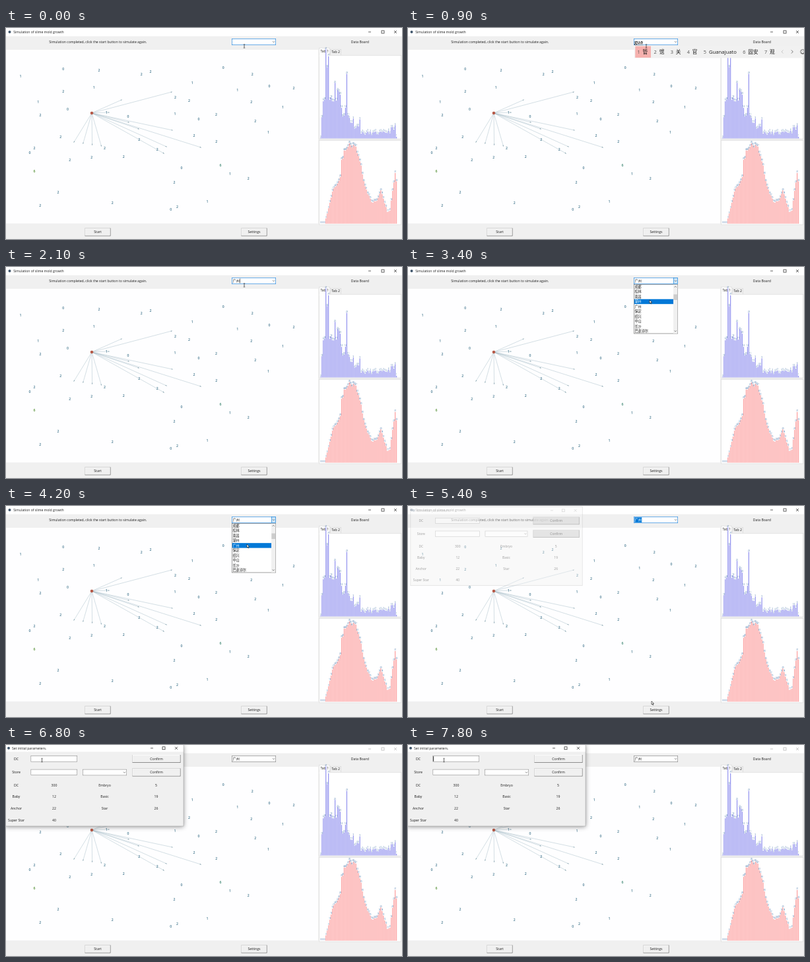
Animation, 600 px wide and 320 px high, one loop 8 s. Source, as an HTML page with a canvas:

```html
<!DOCTYPE html>
<html lang="en">
<head>
<meta charset="utf-8">
<title>Slime mold growth</title>
<style>
html, body { margin: 0; width: 100%; height: 100%; overflow: hidden; background: #f0f0f0; }
canvas { display: block; }
</style>
</head>
<body>
<canvas id="stage" width="600" height="320"></canvas>
<script>
const LOOP = 8000, STEP = 100;
const BLUE = '#0078d7', GREY = '#f0f0f0', INK = '#1c1c1c';
const FONT = '"Open Sans", "Noto Sans CJK SC", "Noto Sans CJK", sans-serif';
const ctx = document.getElementById('stage').getContext('2d');

const clamp = v => Math.max(0, Math.min(1, v));
const lerp = (a, b, k) => a + (b - a) * k;

function seeded(seed) {
  return () => (seed = seed * 16807 % 2147483647) / 2147483647;
}

// Value (or values) at t on a line through [t, ...values] key points
function along(points, t) {
  const next = points.findIndex(p => p[0] >= t);
  if (next < 1) return points.at(next).slice(1);
  const [a, b] = [points[next - 1], points[next]], k = (t - a[0]) / (b[0] - a[0]);
  return a.slice(1).map((v, i) => lerp(v, b[i + 1], k));
}

function fill(x, y, w, h, color) {
  ctx.fillStyle = color;
  ctx.fillRect(x, y, w, h);
}

function box(x, y, w, h, color, border, weight = 0.7) {
  fill(x, y, w, h, color);
  ctx.strokeStyle = border;
  ctx.lineWidth = weight;
  ctx.strokeRect(x + weight / 2, y + weight / 2, w - weight, h - weight);
}

function line(points, color, weight = 0.7) {
  ctx.strokeStyle = color;
  ctx.lineWidth = weight;
  ctx.beginPath();
  points.forEach(([x, y]) => ctx.lineTo(x, y));
  ctx.stroke();
}

function disc(x, y, r, color) {
  ctx.fillStyle = color;
  ctx.beginPath();
  ctx.arc(x, y, r, 0, 7);
  ctx.fill();
}

function text(str, x, y, { color = INK, size = 5.15, align = 'left', weight = 400 } = {}) {
  ctx.font = `${weight} ${size}px ${FONT}`;
  ctx.fillStyle = color;
  ctx.textAlign = align;
  ctx.fillText(str, x, y + size * 0.36);
  return ctx.measureText(str).width;
}

const centred = (str, x, y, options) => text(str, x, y, { align: 'center', ...options });

function chevron(x, y, dy) {
  line([[x - 1.6, y - dy], [x, y + dy], [x + 1.6, y - dy]], '#555');
}

function button(label, x, y, w, h) {
  fill(x, y, w, h, '#707070');
  fill(x, y, w - 0.8, h - 0.8, '#fff');
  fill(x + 0.7, y + 0.7, w - 1.8, h - 1.8, GREY);
  centred(label, x + w / 2, y + h / 2);
}

function windowButtons([min, max, close], y, color) {
  line([[min - 2, y], [min + 2, y]], color);
  ctx.strokeRect(max - 2, y - 2, 4, 4);
  line([[close - 2, y - 2], [close + 2, y + 2]], color);
  line([[close - 2, y + 2], [close + 2, y - 2]], color);
}

// Colony: food values scattered over a jittered grid, thinner towards the bottom
const random = seeded(42);
const food = [];
for (let row = 0; row < 7; row++)
  for (let col = 0; col < 9; col++) {
    const x = 22 + (col + random()) * 47, y = 56 + (row + random()) * 32;
    const label = '2222211100'[Math.floor(random() * 10)];
    if (random() > row * 0.09) food.push({ label, x, y });
  }

const NODE = [130, 129];
const trails = [[175, 109], [251, 97], [156, 128], [186, 143], [201, 153], [252, 155], [243, 180], [239, 190], [295, 181]];
for (let i = 0; i < 4; i++) trails.push([103 + i * 13.8, 173 + i * 2]);

function trail(x, y) {
  line([NODE, [x, y]], '#a9bfc8', 0.5);
  const a = Math.atan2(y - NODE[1], x - NODE[0]);
  ctx.fillStyle = '#6f919e';
  ctx.beginPath();
  for (const turn of [0, 2.7, -2.7]) ctx.lineTo(x + 1.4 * Math.cos(a + turn), y + 1.4 * Math.sin(a + turn));
  ctx.fill();
}

function colony() {
  fill(0, 33, 473, 263.5, '#fefeff');
  trails.forEach(end => trail(...end));
  for (const { label, x, y } of food) centred(label, x, y, { color: '#3f748c', weight: 600 });
  centred('6', 43, 217, { color: '#4c8a2c', weight: 600 });
  centred('6', 325, 208, { color: '#35806c', weight: 600 });
  disc(...NODE, 2.3, '#b65a48');
}

// Charts: a few key points plus noise
function bars(points, noise, seed) {
  const next = seeded(seed);
  return Array.from({ length: 59 }, (_, i) => {
    const [h] = along(points, i);
    return h * (1 + noise * (next() - 0.5));
  });
}

const blueBars = bars([[0, 2], [2, 65], [4, 108], [6, 123], [7, 60], [13, 80], [15, 54], [19, 40], [20, 92], [21, 34],
  [29, 16], [30, 44], [31, 8], [49, 8], [57, 16], [58, 4]], 0.7, 11);
const redBars = bars([[3, 0], [9, 48], [15, 70], [16, 98], [20, 117], [27, 119], [31, 86], [34, 56], [39, 32], [43, 34],
  [46, 52], [51, 18], [53, 20], [57, 77], [58, 64]], 0.08, 5);

function chart(heights, base, scale, color) {
  heights.forEach((h, i) => {
    const x = 476.2 + i * 1.98;
    fill(x, base - h, 1.15, h, color);
    centred(Math.round(h * scale), x + 0.6, base - h - 1.6, { size: 2.6, color: '#3d6fa5' });
  });
}

function board() {
  centred('Data Board', 536.3, 21);
  box(491, 32, 17, 10, GREY, '#d9d9d9');
  box(474, 41, 125, 127.5, '#fff', '#d9d9d9');
  box(474, 30, 17, 12, '#fff', '#d9d9d9');
  fill(474.7, 41, 15.6, 2, '#fff');
  box(474, 170, 125, 128.5, '#fff', '#d9d9d9');
  centred('Tab 1', 482.8, 35.5);
  centred('Tab 2', 499.5, 36.2);
  chart(blueBars, 167.5, 0.3, '#8e8eee');
  chart(redBars, 296.8, 0.4, '#fc9a9a');
}

// City box
const cities = ['成都', '桂林', '南昌', '湖州', '广州', '保定', '绍兴', '中山', '长沙', '巴彦淖尔'];
const typed = ['g', 'gu', 'gua', 'guan', 'guang', "guang'zh", "guang'zho", "guang'zhou"];
const typedAt = t => typed[Math.min(typed.length - 1, (t - 700) / STEP)];

function cityBox(t) {
  const open = t >= 3000 && t < 4500, focused = t < 6800;
  box(342, 16, 67, 10, '#fff', focused ? '#2b8ade' : '#8a8a8a');
  if (open) box(402, 16.3, 7, 9.5, '#cce4f7', BLUE, 0.6);
  chevron(405.5, 21, 0.8);
  if (t >= 700 && t < 1700) {
    const w = text(typedAt(t), 343, 21.8, { size: 7.4, weight: 600 });
    fill(343, 25, w, 0.5, '#444');
  } else if (t >= 1700) {
    const selected = t >= 4500 && focused;
    if (selected) fill(343.3, 17.3, 11, 7.6, BLUE);
    text('广州', 343.6, 21, { color: selected ? '#fff' : INK });
    if (t < 3000) fill(354.2, 17.5, 0.6, 7, INK);
  }
  if (open) cityList(t);
}

function cityList(t) {
  const active = t >= 3400 && t < 4200 ? 3 : 4, pitch = 7.45;
  box(342, 26, 67, 75.3, '#fff', '#777');
  cities.forEach((city, i) => {
    const y = 30.1 + i * pitch;
    if (i === active) fill(342.7, y - pitch / 2, 59.3, pitch, BLUE);
    text(city, 343.4, y, { color: i === active ? '#fff' : INK });
  });
  fill(402, 26.7, 6.3, 74, GREY);
  fill(402.3, 41.5, 5.8, 8.5, '#cdcdcd');
  chevron(405.2, 30, -0.8);
  chevron(405.2, 97.2, 0.8);
}

// Input method bar
const candidates = {
  g: ['个', '高', '给', '过', '跟', '更', '该'],
  gu: ['古', '故', '股', '顾', '固', '骨', '鼓'],
  gua: ['管', '馆', '关', '官', 'Guanajuato', '固安', '观'],
  guan: ['管', '馆', '关', '官', '观', '罐', '冠'],
  guang: ['光', '广', '逛', '广州', '广东', '广告', '光明'],
  "guang'zh": ['广州', '光照', '广州市', '光泽', '广', '光'],
};

function inputBar(t) {
  if (t < 700 || t >= 1800) return;
  ctx.save();
  ctx.globalAlpha = t === 700 || t === 1700 ? 0.5 : 1;
  ctx.translate(0, t === 700 ? 7 : 0);
  fill(343, 26.5, 257, 19, '#f1f1f1');
  fill(344.3, 27.5, 23.7, 17.5, '#f6b1ae');
  let x = 347.5;
  (candidates[typedAt(t)] || candidates["guang'zh"]).forEach((word, i) => {
    text(i + 1, x, 36.2, { size: 7.4, color: '#555' });
    x += 8.1 + text(word, x + 8.1, 36.2, { size: 7.7, weight: 500 }) + 9.3;
  });
  fill(560, 27, 40, 18, '#f1f1f1');
  line([[568.5, 33.5], [566, 36], [568.5, 38.5]], '#b5b5b5');
  line([[580.8, 33.5], [583.3, 36], [580.8, 38.5]], '#444');
  ctx.beginPath();
  ctx.arc(598, 36, 3.4, 0, 7);
  ctx.moveTo(599.7, 37);
  ctx.arc(598, 37, 1.7, 0, Math.PI);
  ctx.stroke();
  disc(596.8, 35, 0.5, '#444');
  disc(599.2, 35, 0.5, '#444');
  ctx.restore();
}

// Settings dialog
const settings = [['DC', 300, 'Embryo', 5], ['Baby', 12, 'Basic', 19], ['Anchor', 22, 'Star', 26], ['Super Star', 40]];
const columns = [15.5, 73, 149.5, 227.5];

function dialog(t) {
  if (t < 5400) return;
  const k = clamp((t - 5320) / 230), size = lerp(0.945, 1, k), focused = t >= 6800;
  ctx.save();
  ctx.globalAlpha = lerp(0.1, 1, k);
  ctx.translate(135, 61);
  ctx.scale(size, size);
  ctx.translate(-135, -61);
  ctx.shadowColor = `rgba(0,0,0,${(focused ? 0.45 : 0.3) * k ** 4})`;
  ctx.shadowBlur = focused ? 7 : 4;
  ctx.shadowOffsetY = 1;
  fill(-1, -1, 270, 124, GREY);
  ctx.shadowColor = 'transparent';
  ctx.lineWidth = 0.6;
  ctx.strokeStyle = '#a8a8a8';
  ctx.strokeRect(-1, -1, 270, 124);
  fill(-1, -1, 269.5, 11.3, '#fff');
  const color = focused ? INK : '#999';
  disc(4, 4.7, 2, focused ? '#40566c' : '#9aa6b2');
  text('Set initial parameters.', 9, 4.8, { color });
  windowButtons([221, 239, 258], 4.8, color);
  ['DC', 'Store'].forEach((label, i) => {
    const y = 21 + i * 20.5;
    centred(label, 15.5, y);
    box(37.5, y - 4.7, 70.5, 9.2, '#fff', '#8a8a8a', 0.6);
    button('Confirm', 191.5, y - 6, 73, 12);
  });
  box(116, 36.8, 67, 9.4, '#fff', '#8a8a8a', 0.6);
  chevron(179.5, 41.5, 0.8);
  settings.forEach((row, i) => row.forEach((cell, n) => centred(cell, columns[n], 61 + i * 17.6)));
  if (t >= 6900 && (t - 6900) % 900 < 600) fill(38.2, 17.2, 0.9, 7.6, INK);
  ctx.restore();
}

// Pointer: time and place of the hot spot
const path = [[2500, 361, 27.5], [2900, 404, 20], [3100, 404, 21], [3400, 366, 50], [4100, 366, 50], [4200, 365, 58],
  [4600, 365, 58], [5200, 374, 307], [5300, 374, 307], [5400, 369, 296], [5900, 122, 25.5], [6200, 60, 23], [6300, 54.5, 23]];

function pointer(t) {
  const [x, y] = along(path, t);
  if (t < 2800 || t >= 6200) {
    line([[x, y - 2.6], [x, y + 2.6]], '#222');
    for (const end of [-2.8, 2.8]) line([[x - 1.3, y + end], [x + 1.3, y + end]], '#222', 0.5);
    return;
  }
  ctx.beginPath();
  for (const [dx, dy] of [[0, 0], [0, 5], [1.2, 4], [2.1, 6], [2.9, 5.6], [2.1, 3.7], [3.6, 3.6]]) ctx.lineTo(x + dx, y + dy);
  ctx.closePath();
  ctx.fillStyle = '#fff';
  ctx.strokeStyle = '#111';
  ctx.lineWidth = 0.6;
  ctx.fill();
  ctx.stroke();
}

function draw(now) {
  const t = Math.floor(now % LOOP / STEP) * STEP;
  fill(0, 0, 600, 320, GREY);
  fill(0, 0, 600, 12.5, '#fff');
  disc(5.5, 6, 2, '#40566c');
  text('Simulation of slime mold growth', 11.3, 6, { size: 5.05 });
  windowButtons([551, 571, 590], 6, t >= 6800 ? '#b0b0b0' : '#222');
  text('Simulation completed, click the start button to simulate again.', 65.3, 21);
  colony();
  board();
  button('Start', 119.5, 303.5, 39, 12);
  button('Settings', 356.5, 303.5, 39, 12);
  cityBox(t);
  inputBar(t);
  dialog(t);
  pointer(t);
}

const start = performance.now();
(function tick() {
  draw(performance.now() - start);
  requestAnimationFrame(tick);
})();
</script>
</body>
</html>
```
